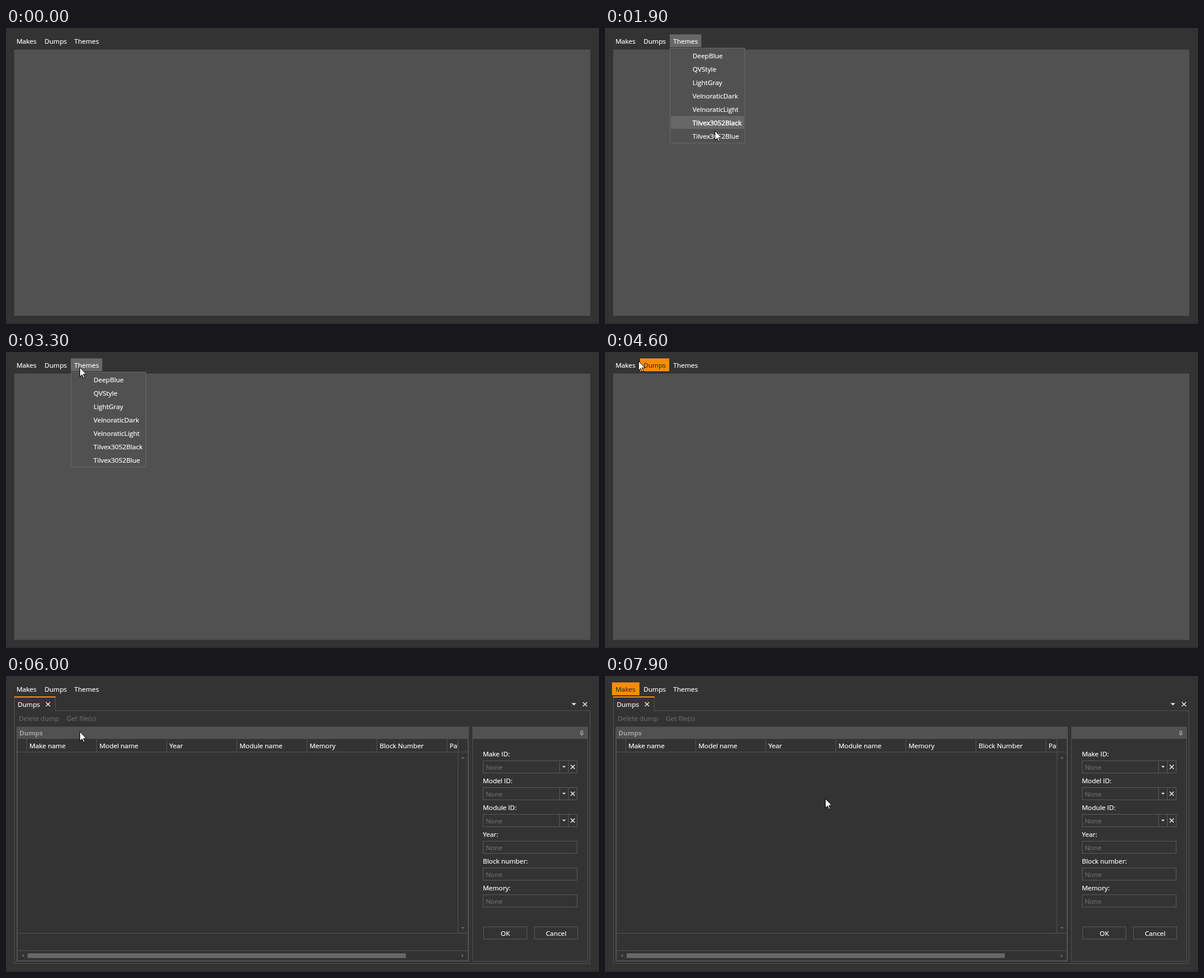
These frames come from a looping animation (1016x508 px, 8000 ms). An HTML page:

```html
<!DOCTYPE html>
<html lang="en">
<head>
<meta charset="utf-8">
<title>Dumps</title>
<style>
html, body { margin: 0; width: 100%; height: 100%; overflow: hidden; background: #333; }
svg { display: block; width: 1016px; height: 508px; }
text { font: 11.4px "Open Sans", "Noto Sans", sans-serif; fill: currentColor; stroke: currentColor; stroke-width: .2px; }
.strong { stroke-width: .5px; }
.bold { font-weight: 700; stroke: none; }
.mid { text-anchor: middle; }
rect { shape-rendering: crispEdges; }
</style>
</head>
<body>
<svg id="stage" viewBox="0 0 1016 508"></svg>
<script>
const LINE = '#515151', EDGE = '#595959', HOVER = '#676767', ORANGE = '#f88c0a', DIM = '#6a6a6a';

const rect = (x, y, w, h, fill = LINE) => `<rect x="${x}" y="${y}" width="${w}" height="${h}" fill="${fill}"/>`;
const box = (x, y, w, h, stroke = LINE, fill = 'none') =>
  `<rect x="${x + .5}" y="${y + .5}" width="${w - 1}" height="${h - 1}" fill="${fill}" stroke="${stroke}"/>`;
const text = (x, y, s, color = '#fff', kind = '') => `<text x="${x}" y="${y}" color="${color}" class="${kind}">${s}</text>`;
const path = (d, more) => `<path d="${d}" ${more}/>`;
const cross = (x, y, r = 3.5) =>
  path(`M${x - r} ${y - r}l${2 * r} ${2 * r}m0 ${-2 * r}l${-2 * r} ${2 * r}`, 'stroke="#e6e6e6" stroke-width="1.5" fill="none"');
const arrow = (x, y, r, turn = 0, fill = '#eee') =>
  path(`M${-r} ${-r / 2}H${r}L0 ${r / 2}z`, `fill="${fill}" transform="translate(${x} ${y}) rotate(${turn})"`);

const menu = [['Makes', 12, 47, 18], ['Dumps', 60, 50, 66], ['Themes', 111, 54, 117]];
const themes = ['DeepBlue', 'QVStyle', 'LightGray', 'VelnoraticDark', 'VelnoraticLight', 'Tilvex3052Black', 'Tilvex3052Blue'];
const columns = ['Make name', 'Model name', 'Year', 'Module name', 'Memory', 'Block Number', 'Path'];
const fields = ['Make ID:', 'Model ID:', 'Module ID:', 'Year:', 'Block number:', 'Memory:'];

function dumpsGrid() {
  let s = rect(18, 87, 775, 21) + text(23, 102, 'Dumps', '#a0a0a0', 'bold');
  s += rect(18, 108, 2, 382) + rect(791, 108, 2, 382) + rect(18, 488, 775, 2);
  for (const y of [130, 441, 471]) s += rect(20, y, 771, 1);
  s += rect(774, 108, 1, 333);
  s += '<clipPath id="head"><rect x="20" y="108" width="754" height="22"/></clipPath><g clip-path="url(#head)">';
  columns.forEach((name, i) => {
    s += rect(35 + 120 * i, 108, 1, 22) + text(40 + 120 * i, 124, name);
  });
  s += '</g>' + rect(37, 476, 648, 8, HOVER);
  return s + arrow(783, 140, 3, 180, DIM) + arrow(783, 432.5, 3, 0, DIM) +
    arrow(29, 480, 3, 90, DIM) + arrow(782.5, 480, 3, -90, DIM);
}

function filterForm() {
  let s = box(799, 87, 198, 403) + rect(799, 87, 198, 21);
  s += path('M984.5 94.5h4M985 94.5v5M988 94.5v5M983 99.5h7M986.5 100v3.5', 'stroke="#b0b0b0" fill="none"');
  fields.forEach((name, i) => {
    const y = 145 + 46 * i;
    s += text(817, y - 7, name) + box(817, y, 162, 22, EDGE) + text(822, y + 16, 'None', '#746c74');
    if (i < 3) {
      s += rect(948, y, 1, 22, EDGE) + rect(963, y, 1, 22, EDGE);
      s += arrow(956, y + 11, 3) + cross(971, y + 11);
    }
  });
  ['OK', 'Cancel'].forEach((name, i) => {
    const x = 818 + 87 * i;
    s += box(x, 430, 75, 22, EDGE) + text(x + 37.5, 446, name, '#fff', 'mid');
  });
  return s;
}

const emptyView = rect(14, 37, 987, 457);
const dumpsView = rect(14, 35, 71, 2, ORANGE) + rect(14, 37, 1, 457) + rect(84, 37, 1, 23) +
  rect(84, 59, 917, 1) + rect(1000, 59, 1, 435) + rect(14, 493, 987, 1) +
  text(20, 53, 'Dumps') + cross(72, 48.5) + arrow(973, 48.5, 4) + cross(992, 48.5) +
  text(22, 77, 'Delete dump', DIM) + text(104, 77, 'Get file(s)', DIM) + dumpsGrid() + filterForm();
const pointer = path('M.5 .5V16.6L4.2 13.1L6.7 18.6L8.9 17.6L6.5 12.2H11.6z', 'fill="#fff" stroke="#000"');

// Key points of the pointer: [tick, x, y], one tick is 100 ms
const keys = [
  [2, 931, 73], [6, 270, 58], [10, 85, 45], [13, 130, 21], [14, 130, 21], [19, 188, 176], [20, 190, 194],
  [27, 176, 42], [30, 164, 31], [37, 83, 22], [45, 83, 22], [46, 57, 15], [48, 38, 12], [49, 40, 14], [55, 40, 14],
  [59, 116, 81], [60, 126, 95], [61, 128, 97], [68, 35, 21], [70, 35, 21], [79, 377, 210]
];

// Smooth curve through the key points that never overshoots them
function pointerAt(tick) {
  const last = keys.length - 2;
  const i = Math.max(0, keys.findIndex(k => k[0] >= tick) - 1);
  const span = keys[i + 1][0] - keys[i][0], t = (tick - keys[i][0]) / span;
  return [1, 2].map(n => {
    const slope = j => {
      j = Math.min(last, Math.max(0, j));
      return (keys[j + 1][n] - keys[j][n]) / (keys[j + 1][0] - keys[j][0]);
    };
    const tangent = j => {
      const a = slope(j - 1), b = slope(j);
      return a * b > 0 ? 2 * a * b / (a + b) : 0;
    };
    const from = keys[i][n], to = keys[i + 1][n], u = 1 - t;
    return Math.round(from + (to - from) * t * t * (3 - 2 * t) +
      span * t * u * (u * tangent(i) - t * tangent(i + 1)));
  });
}

// [first tick, lit menu entry]
const hovers = [[0, -1], [11, 1], [12, 2], [35, 1], [60, -1], [67, 0]];

function popup(tick) {
  // The lit row trails the pointer a little
  const lit = Math.floor((pointerAt(tick - .5)[1] - 36) / 23);
  return box(111, 34, 129, 164, HOVER, LINE) + themes.map((name, i) => {
    const y = 36 + 23 * i;
    return i === lit ? rect(113, y, 125, 22, HOVER) + text(150, y + 16, name, '#fff', 'strong') : text(150, y + 16, name);
  }).join('');
}

function scene(tick) {
  const open = tick >= 15 && tick < 35;
  const hover = hovers.filter(h => h[0] <= tick).pop()[1];
  let s = rect(0, 0, 1016, 508, '#333') + rect(0, 506, 1016, 2, '#2f2c2c');
  s += tick < 60 ? emptyView : dumpsView;
  menu.forEach(([name, x, w, tx], i) => {
    const on = i === hover;
    if (on) s += rect(x, 11, w, 22, open ? HOVER : ORANGE);
    s += text(tx, 27, name, on && !open ? '#333' : '#fff');
  });
  if (open) s += popup(tick);
  if (tick >= 2) s += `<g transform="translate(${pointerAt(tick)})">${pointer}</g>`;
  return s;
}

const stage = document.getElementById('stage');
let shown = -1;
function frame() {
  const tick = Math.floor(performance.now() % 8000 / 100);
  if (tick !== shown) stage.innerHTML = scene(shown = tick);
  requestAnimationFrame(frame);
}
frame();
</script>
</body>
</html>
```
